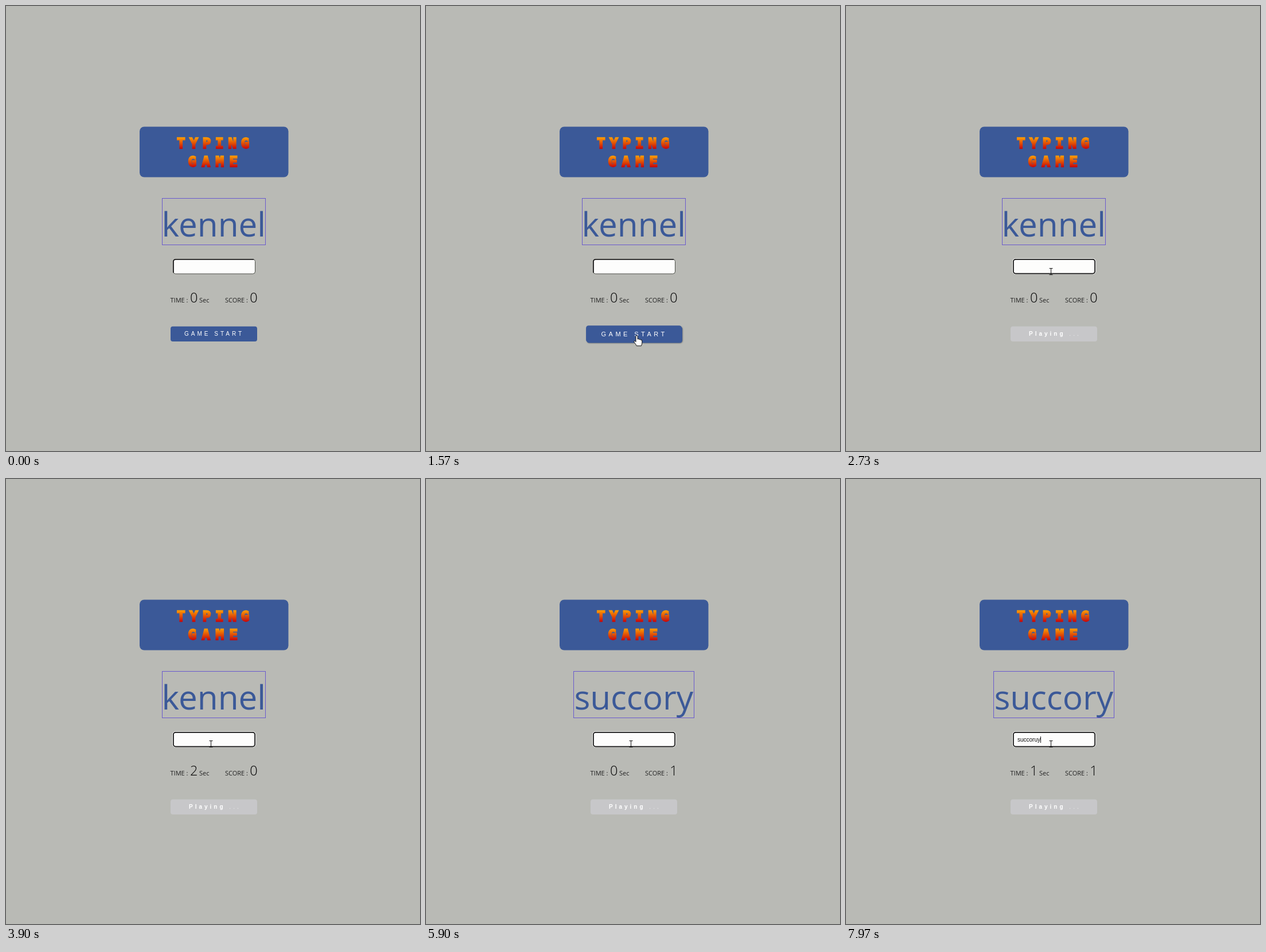
An HTML page for the animation above (8000 ms loop, 722x776 px).

```html
<!DOCTYPE html>
<html lang="en">
<head>
<meta charset="utf-8">
<title>Typing game</title>
<style>
  html, body { margin: 0; width: 100%; height: 100%; overflow: hidden; background: #b9bab5; }
  svg { display: block; width: 722px; height: 776px; }
  text { white-space: pre; }
  .title { font: bold 24px "DejaVu Sans Mono", monospace; fill: url(#fire); stroke: url(#fire); stroke-width: 2.3; }
  .word { font: 58.4px "Open Sans", "Noto Sans", sans-serif; fill: #3b5998; text-anchor: middle; }
  .label { font: 11px "Open Sans", "Noto Sans", sans-serif; fill: #222; }
  .number { font: 300 23.5px "Open Sans", "Noto Sans", sans-serif; fill: #080808; text-anchor: middle; }
  .typed { font: 10px "Liberation Sans", Arial, sans-serif; fill: #111; }
  .button { font: 10px "Liberation Sans", Arial, sans-serif; fill: #fff; letter-spacing: 4px; }
</style>
</head>
<body>
<svg viewBox="0 0 722 776">
  <defs>
    <linearGradient id="fire" gradientUnits="userSpaceOnUse" x1="0" y1="228" x2="0" y2="260" spreadMethod="repeat">
      <stop offset="0" stop-color="#ffa500"/>
      <stop offset=".64" stop-color="#c80a0a"/>
      <stop offset="1" stop-color="#c80a0a"/>
    </linearGradient>
    <filter id="soft" x="-10%" y="-30%" width="120%" height="160%"><feGaussianBlur stdDeviation="1"/></filter>
  </defs>
  <rect width="722" height="776" fill="#b9bab5"/>

  <rect x="233" y="210.5" width="259.5" height="88" rx="8" fill="#3b5998"/>
  <text class="title" x="298" y="247.6" letter-spacing="7.9">TYPING</text>
  <text class="title" x="317.6" y="279.6" letter-spacing="9.5">GAME</text>

  <rect id="wordBox" y="335.5" height="81" fill="none" stroke="#6a5acd"/>
  <text id="word" class="word" x="362.3" y="402"></text>

  <g id="idleInput">
    <rect x="291.5" y="441.5" width="143" height="25.5" rx="4" fill="#fdfdfc" stroke="#4c4f48"/>
    <path d="M292 465V446Q292 442 296 442H432" fill="none" stroke="#111" stroke-width="1.6"/>
  </g>
  <g id="focusInput">
    <rect x="290.5" y="440.5" width="145" height="27" rx="5" fill="none" stroke="#fff" stroke-opacity=".8"/>
    <rect x="291.9" y="441.9" width="142.2" height="24.7" rx="4" fill="#fdfdfc" stroke="#101010" stroke-width="1.7"/>
  </g>
  <text id="typed" class="typed" x="299" y="458"></text>
  <path id="caret" d="M0 449V460" stroke="#111"/>

  <text class="label" x="286.5" y="517">TIME :</text>
  <text id="time" class="number" x="327.7" y="517"></text>
  <text class="label" x="337" y="517">Sec</text>
  <text class="label" x="382" y="517">SCORE :</text>
  <text id="score" class="number" x="432" y="517"></text>

  <g id="button">
    <g id="shadow">
      <rect x="288.5" y="560.5" width="151" height="26" rx="4" fill="#555" opacity=".75" filter="url(#soft)"/>
      <rect x="288" y="560" width="151" height="26" rx="4" fill="#3b5998"/>
    </g>
    <rect id="face" x="287" y="558.7" width="151" height="26.3" rx="4"/>
    <text id="startText" class="button" x="311" y="575.3">GAME START</text>
    <text id="playText" class="button" x="319" y="575.3"><tspan font-weight="bold">Playing</tspan> <tspan opacity=".65">...</tspan></text>
  </g>

  <g id="pointers">
    <path id="arrow" d="M0 0V15L3.5 11.8L6 17.3L8.4 16.3L6 11H10.6Z" fill="#fff" stroke="#111"/>
    <path id="hand" d="M-1.6 1.4Q-1.6 0 0 0Q1.5 0 1.5 1.4V6.4Q3.8 5 4.4 7Q6.4 5.8 7 7.8Q9.2 7 9.2 9.4V13Q9 15.4 7.8 18H-.4Q-1.2 15.2-4.2 12.2Q-5.6 10.2-4.2 9.4Q-2.8 9-1.6 11Z" fill="#fff" stroke="#111"/>
    <g id="blocked" fill="#fff" stroke="#c8101c" stroke-width="2">
      <circle r="6.7" stroke="#fff" stroke-width="1"/>
      <circle r="5.3"/>
      <path d="M-3.7-3.7L3.7 3.7"/>
    </g>
    <path id="beam" d="M-3-5H3M0-5V5.5M-3 6H3" fill="none" stroke="#111"/>
  </g>
</svg>
<script>
const LOOP = 8000, START = 2000, MATCH = 5130;
const $ = id => document.getElementById(id);
const show = (id, on) => $(id).setAttribute("visibility", on ? "visible" : "hidden");
const clamp = x => Math.min(1, Math.max(0, x));
const ease = x => { x = clamp(x); return x * x * (3 - 2 * x); };
const latest = (steps, t) => steps.filter(s => s[0] <= t).pop();

const clock = [[0, 0], [3030, 2], [4030, 1], [5030, 0], [6030, 2], [7030, 1]];
const path = [[600, 402, 790], [1060, 368, 574.5], [1500, 368, 574.5], [1850, 364, 576], [2250, 364, 576], [2760, 357.5, 461.5]];

// Each word with its box width and the times of its keystrokes
const rounds = [
  { word: "kennel", width: 180, keys: "kenne", times: [4130, 4330, 4500, 4700, 4900] },
  { word: "succory", width: 210, keys: "succoruy", times: [6430, 6600, 6770, 6970, 7170, 7370, 7600, 7830] }
];

function pointerAt(t) {
  const i = path.findIndex(p => p[0] > t);
  if (i < 0) return path[path.length - 1].slice(1);
  if (i === 0) return path[0].slice(1);
  const [t0, x0, y0] = path[i - 1], [t1, x1, y1] = path[i];
  const k = ease((t - t0) / (t1 - t0));
  return [x0 + (x1 - x0) * k, y0 + (y1 - y0) * k];
}

function drawInput(t, round) {
  const focused = t >= START;
  const count = round.times.filter(time => time <= t).length;
  show("idleInput", !focused);
  show("focusInput", focused);
  $("typed").textContent = round.keys.slice(0, count);

  const since = Math.max(START, t >= MATCH ? MATCH : 0, count ? round.times[count - 1] : 0);
  show("caret", focused && (t - since) % 1000 < 500);
  const end = 299 + (count ? $("typed").getComputedTextLength() : 0);
  $("caret").setAttribute("transform", `translate(${Math.floor(end + 0.1) + 0.5} 0)`);
}

function drawButton(t) {
  const playing = t >= START;
  const hover = ease((t - 960) / 160) * (1 - ease((t - 2380) / 160));
  const scale = 1 + 0.105 * hover;
  $("button").setAttribute("transform", `translate(362.5 572) scale(${scale}) translate(-362.5 -572)`);
  $("shadow").setAttribute("opacity", hover);
  $("face").setAttribute("fill", playing ? "#c7c7c9" : "#3b5998");
  show("startText", !playing);
  show("playText", playing);
}

function drawPointer(t) {
  const [x, y] = pointerAt(t);
  const overButton = y > 557 && y < 587;
  const overInput = y < 468;
  const kind = overInput ? "beam" : !overButton ? "arrow" : t < START ? "hand" : "blocked";
  for (const id of ["arrow", "hand", "blocked", "beam"]) show(id, id === kind);
  $("pointers").setAttribute("transform", `translate(${x} ${y})`);
}

function draw(t) {
  const won = t >= MATCH;
  const round = rounds[won ? 1 : 0];
  $("word").textContent = round.word;
  $("wordBox").setAttribute("x", 362.5 - round.width / 2);
  $("wordBox").setAttribute("width", round.width);
  $("time").textContent = latest(clock, t)[1];
  $("score").textContent = won ? 1 : 0;
  drawInput(t, round);
  drawButton(t);
  drawPointer(t);
}

function frame() {
  draw(performance.now() % LOOP);
  requestAnimationFrame(frame);
}
frame();
</script>
</body>
</html>
```
